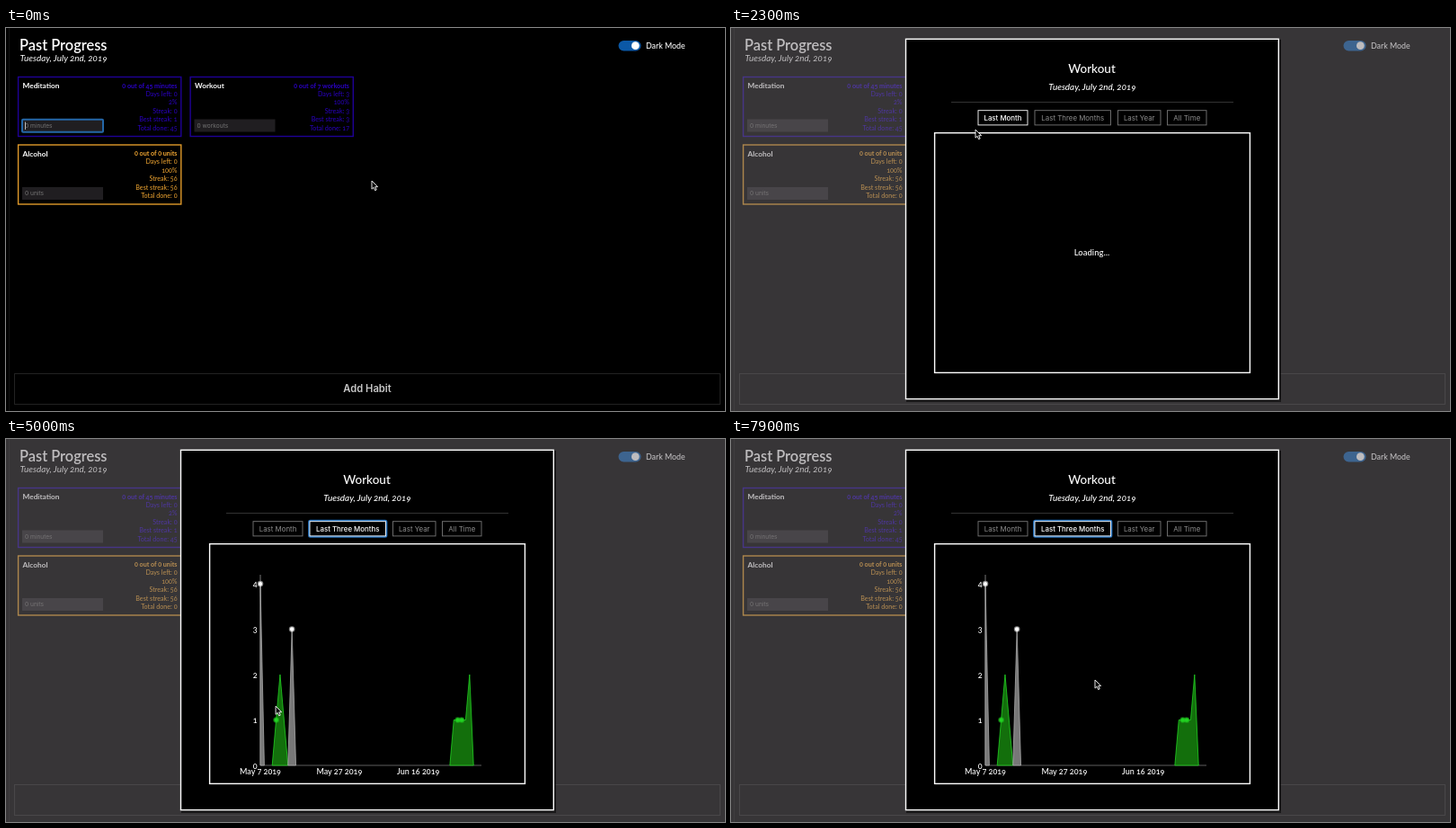
An HTML page for the animation above (8000 ms loop, 800 by 426 pixels).

```html
<!DOCTYPE html>
<html lang="en">
<head>
<meta charset="utf-8">
<title>Past Progress</title>
<style>
  html, body { margin: 0; width: 100%; height: 100%; overflow: hidden; background: #000; }
  svg { display: block; width: 100vw; height: 100vh; }
  text { font-family: Lato, sans-serif; font-variant-numeric: oldstyle-nums; fill: #fff; dominant-baseline: central; }
  .ui { font-family: Inter, sans-serif; }
</style>
</head>
<body>
<svg id="stage" viewBox="0 0 800 426"></svg>
<script>
const LOOP = 8000, STEP = 100;
const MENU_OPEN = 1400, MODAL_OPEN = 2300, LOADED = 2600, RANGE_CLICK = 3700;
const BLUE = '#1e0096', BLUE_TEXT = '#2a00c4', ORANGE = '#e09a2a', ORANGE_TEXT = '#f5a932', GREEN = '#22d322';
const BORDER = 1.4;
const DATE = 'Tuesday, July 2nd, 2019';
const stage = document.getElementById('stage');

function add(parent, tag, attrs = {}, content = '') {
  const el = document.createElementNS('http://www.w3.org/2000/svg', tag);
  for (const key in attrs) el.setAttribute(key, attrs[key]);
  el.textContent = content;
  parent.append(el);
  return el;
}
const group = (parent, attrs) => add(parent, 'g', attrs);
const box = (parent, x, y, width, height, attrs) =>
  add(parent, 'rect', { x, y, width, height, fill: 'none', ...attrs });
const label = (parent, x, y, size, content, attrs) =>
  add(parent, 'text', { x, y, 'font-size': size, ...attrs }, content);
const line = (parent, x1, y1, x2, y2, stroke, width = 1) =>
  add(parent, 'line', { x1, y1, x2, y2, stroke, 'stroke-width': width });
const show = (el, visible) => el.setAttribute('display', visible ? 'inline' : 'none');
const middle = { 'text-anchor': 'middle' };

// Page
const page = group(stage);
box(page, 0, 0, 800, 426, { fill: '#000' });
line(page, 3.5, 0, 3.5, 426, '#111');
label(page, 15, 18, 16.4, 'Past Progress', { 'font-weight': 600 });
label(page, 15.5, 33.3, 9.9, DATE, { 'font-style': 'italic' });
box(page, 681.5, 14, 25, 11.5, { rx: 5.75, fill: '#0b58a6' });
add(page, 'circle', { cx: 700.3, cy: 19.7, r: 4.4, fill: '#fff' });
label(page, 712, 19.5, 8.8, 'Dark Mode', { 'font-weight': 500 });
box(page, 9.5, 384.5, 785, 34, { stroke: '#222' });
label(page, 402, 401.2, 11.2, 'Add Habit', { ...middle, class: 'ui', 'font-weight': 600, style: 'fill:#c8c8c8' });

function card(x, y, border, color, name, unit, stats) {
  box(page, x + .6, y + 1, 181.2, 66, { stroke: border, 'stroke-width': BORDER });
  label(page, x + 5.5, y + 10.5, 8.3, name, { 'font-weight': 700 });
  box(page, x + 5, y + 48, 90, 14, { fill: '#201e21' });
  label(page, x + 8, y + 55.2, 6.6, '0 ' + unit, { class: 'ui', style: 'fill:#747474' });
  stats.forEach((stat, i) => label(page, x + 177.5, y + 10.5 + i * 9.45, 7.15, stat, {
    'text-anchor': 'end', 'font-weight': i ? 400 : 700, style: `fill:${color}`
  }));
}
card(13, 53.5, BLUE, BLUE_TEXT, 'Meditation', 'minutes',
  ['0 out of 45 minutes', 'Days left: 0', '2%', 'Streak: 0', 'Best streak: 1', 'Total done: 45']);
card(204.5, 53.5, BLUE, BLUE_TEXT, 'Workout', 'workouts',
  ['0 out of 7 workouts', 'Days left: 3', '100%', 'Streak: 3', 'Best streak: 3', 'Total done: 17']);
card(13, 129, ORANGE, ORANGE_TEXT, 'Alcohol', 'units',
  ['0 out of 0 units', 'Days left: 0', '100%', 'Streak: 56', 'Best streak: 56', 'Total done: 0']);

const focus = group(page);
box(focus, 18, 101.7, 90, 14, { stroke: '#2467a8', 'stroke-width': 2, rx: 1 });
const caret = line(focus, 21.5, 104.5, 21.5, 113, '#ddd', .8);

// Dropdown menu
const arrowhead = add(page, 'path', { d: 'M245.5 62.5h7.5l-3.75 4.5z', fill: '#fff' });
const menu = group(page);
const items = ['Suspend', 'Edit Goal', 'Add Note', 'View Graph'].map((name, i) => {
  const y = 69.5 + i * 12.8;
  const rect = box(menu, 246, y, 50, 12.8, { fill: '#000', 'stroke-width': .9 });
  const text = label(menu, 271, y + 6.3, 6.5, name, { ...middle, class: 'ui', 'font-weight': 500 });
  return { y, rect, text };
});

// Modal
const modal = group(stage);
box(modal, 0, 0, 800, 426, { fill: '#757175', opacity: .47 });
box(modal, 195, 13, 417, 403, { fill: '#111', opacity: .75 });
box(modal, 194.5, 12.3, 414.8, 400.3, { fill: '#000', stroke: '#fff', 'stroke-width': BORDER });
label(modal, 401.5, 45.3, 13.5, 'Workout', { ...middle, 'font-weight': 500 });
label(modal, 402, 65, 9.9, DATE, { ...middle, 'font-style': 'italic', 'font-weight': 500 });
line(modal, 245, 82.5, 559, 82.5, '#333');

const buttons = [
  [275, 55, 'Last Month'], [338, 84.5, 'Last Three Months'],
  [430.5, 47.5, 'Last Year'], [485.5, 43.5, 'All Time']
].map(([x, width, name]) => ({
  ring: box(modal, x - .9, 90.8, width + 1.8, 18, { stroke: '#2470bb', 'stroke-width': 2, rx: 1.5 }),
  rect: box(modal, x, 91.7, width, 16.2, { 'stroke-width': .9 }),
  text: label(modal, x + width / 2, 99.7, 7.9, name, { ...middle, class: 'ui' })
}));

const loading = label(modal, 401.5, 249.5, 9.5, 'Loading...', { ...middle, 'font-weight': 500 });

// Charts: days are counted from May 7
const LEFT = 283, RIGHT = 529, BASE = 363, TOP = 151, LAST_DAY = 56;
const RUNS = [
  { color: '#aaa', fill: '#777', points: [[0, 0], [0, 4], [1, 0]] },
  { color: GREEN, fill: '#136f0c', points: [[3, 0], [4, 1], [5, 2], [7, 0]] },
  { color: '#aaa', fill: '#777', points: [[7, 0], [8, 3], [9, 0]] },
  { color: GREEN, fill: '#136f0c', points: [[48, 0], [49, 1], [52, 1], [53, 2], [54, 0]] }
];
const NOTES = [[0, 4, '#fff'], [4, 1, GREEN], [8, 3, '#fff'], [50, 1, GREEN], [51, 1, GREEN]];

function chart(firstDay, peak, tickDays, tickNames) {
  const root = group(modal), halos = {};
  const px = day => LEFT + (day - firstDay) * (RIGHT - LEFT) / (LAST_DAY - firstDay);
  const py = value => BASE - value * (BASE - TOP) / (peak * 1.05);
  line(root, LEFT, TOP, LEFT, BASE, '#999', .8);
  line(root, LEFT, BASE, RIGHT, BASE, '#777', .8);
  for (const run of RUNS.filter(r => r.points[0][0] >= firstDay))
    add(root, 'polygon', {
      points: run.points.map(([day, value]) => [px(day), py(value)]).join(' '),
      fill: run.fill, stroke: run.color, 'stroke-width': .8
    });
  for (const [day, value, color] of NOTES.filter(n => n[0] >= firstDay)) {
    const at = { cx: px(day), cy: py(value), fill: color };
    halos[day] = add(root, 'circle', { ...at, r: 3.3, opacity: .5 });
    add(root, 'circle', { ...at, r: 2.2 });
  }
  for (let value = 0; value <= peak; value++)
    label(root, 279.5, py(value) + .3, 9, value, { 'text-anchor': 'end', 'font-weight': 500 });
  tickDays.forEach((day, i) => label(root, px(day), 369.7, 9, tickNames[i], { ...middle, 'font-weight': 500 }));
  return { root, halos };
}
const month = chart(26, 2, [26, 36, 46], ['Jun 2 2019', 'Jun 12 2019', 'Jun 22 2019']);
const quarter = chart(0, 4, [0, 20, 40], ['May 7 2019', 'May 27 2019', 'Jun 16 2019']);

// Note panel
const panel = group(modal);
box(panel, 227, 117, 350, 46, { fill: '#000' });
line(panel, 227, 163.3, 577, 163.3, '#fff', BORDER);
line(panel, 318, 139.5, 486, 139.5, '#333');
const noteDate = label(panel, 402, 128, 9.1, '', { ...middle, 'font-weight': 500 });
const noteText = label(panel, 402, 151, 9.35, '', { ...middle, 'font-weight': 500 });
box(modal, 226.6, 116.7, 350.8, 266.7, { stroke: '#fff', 'stroke-width': BORDER });

const HOVERS = [
  { from: 5100, to: 6100, day: 4, date: 'Saturday, May 11th, 2019',
    text: 'Feeling better from the injury! Back at it with a light jog this morning.' },
  { from: 6400, to: 7200, day: 8, date: 'Wednesday, May 15th, 2019',
    text: 'Overdid it again. Might be injured for a while.' }
];

// Pointer
const pointer = group(stage);
const arrow = add(pointer, 'path', {
  d: 'M0 0v9.2l2.1-1.9 1.5 3.4 1.6-.7-1.5-3.3h2.9z',
  fill: '#000', stroke: '#fff', 'stroke-width': .9
});
const hand = add(pointer, 'path', {
  d: 'M-.9.8Q0-.6.9.8V4l3.4.8Q5 5.3 4.7 7L3.8 10H-.5L-3.2 6.4Q-3.4 5-2.2 5.3L-.9 6.4z',
  fill: '#fff', stroke: '#000', 'stroke-width': .6
});
const PATH = [
  [0, 407, 170], [500, 407, 170], [1100, 250, 64], [1500, 250, 64], [2100, 272, 113],
  [2500, 272, 113], [3300, 369, 99], [4300, 369, 99], [5100, 297, 306], [6000, 297, 306],
  [6500, 322, 210], [7100, 322, 210], [7700, 405, 268], [8000, 405, 268]
];

function pointerAt(t) {
  const i = PATH.findIndex(p => p[0] > t);
  const [t0, x0, y0] = PATH[i - 1], [t1, x1, y1] = PATH[i];
  const u = (t - t0) / (t1 - t0), e = u * u * (3 - 2 * u);
  return [x0 + (x1 - x0) * e, y0 + (y1 - y0) * e];
}

function render(t) {
  const [x, y] = pointerAt(t);
  const inModal = t >= MODAL_OPEN, loaded = t >= LOADED, ranged = t >= RANGE_CLICK;
  const overCard = x > 204 && x < 387 && y > 53 && y < 121;

  show(focus, t < MENU_OPEN);
  show(caret, t % 1000 < 500);
  show(arrowhead, overCard && !inModal);
  show(menu, t >= MENU_OPEN && !inModal);
  for (const { y: top, rect, text } of items) {
    const over = y >= top && y < top + 12.8;
    rect.setAttribute('stroke', over ? '#ccc' : '#303030');
    // The highlighted item goes on top so that its whole border shows
    if (over && menu.lastChild !== text) menu.append(rect, text);
  }

  show(modal, inModal);
  show(loading, !loaded);
  show(month.root, loaded && !ranged);
  show(quarter.root, ranged);
  buttons.forEach(({ ring, rect, text }, i) => {
    const active = i === (ranged ? 1 : 0);
    show(ring, active && ranged);
    rect.setAttribute('stroke', active ? '#fff' : '#777');
    text.style.fill = active ? '#fff' : '#8c8c8c';
    text.setAttribute('font-weight', active ? 500 : 400);
  });

  const hover = HOVERS.find(h => t >= h.from && t < h.to);
  show(panel, !!hover);
  noteDate.textContent = hover ? hover.date : '';
  noteText.textContent = hover ? hover.text : '';
  for (const day in quarter.halos)
    quarter.halos[day].setAttribute('r', hover && hover.day === +day ? 5.2 : 3.3);

  const overRange = x > 338 && x < 422 && y > 91 && y < 108;
  const clickable = inModal ? overRange : t >= 1100;
  show(hand, clickable);
  show(arrow, !clickable);
  pointer.setAttribute('transform', `translate(${x} ${y})`);
}

const start = performance.now();
function tick() {
  const elapsed = Math.max(0, performance.now() - start) % LOOP;
  render(Math.floor(elapsed / STEP) * STEP);
  requestAnimationFrame(tick);
}
tick();
</script>
</body>
</html>
```
